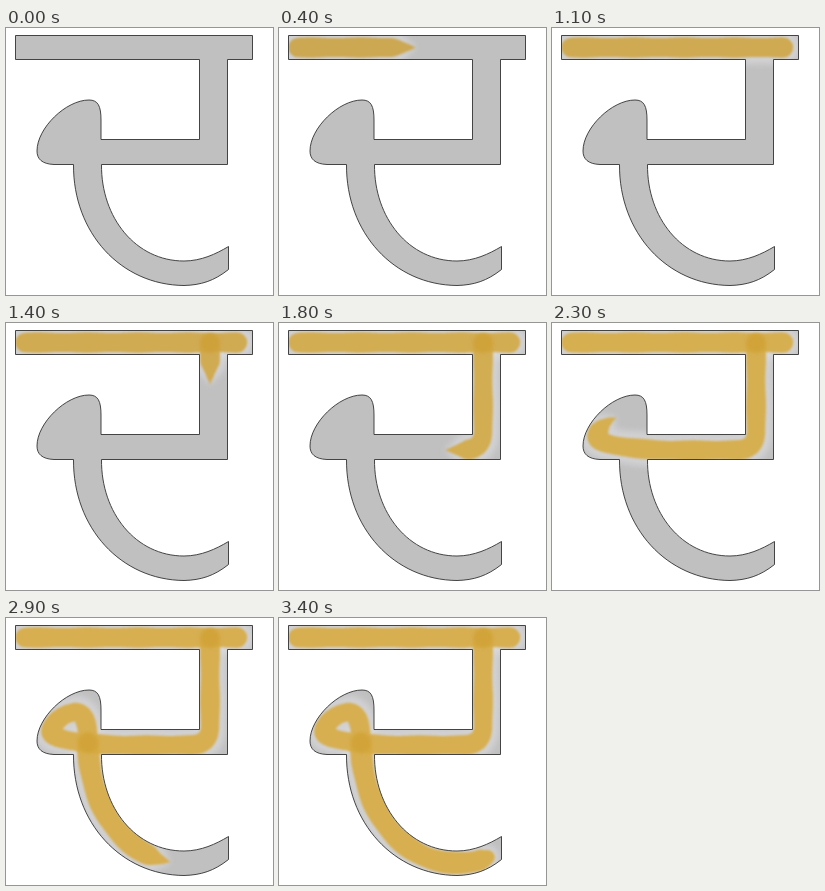
An HTML page with a canvas that plays this animation: 267x267 px, repeating every 3500 ms.

```html
<!DOCTYPE html>
<html lang="en">
<head>
<meta charset="utf-8">
<title>Letter stroke order</title>
<style>
  html, body { margin: 0; width: 100%; height: 100%; overflow: hidden; background: #fff; }
  canvas { display: block; }
</style>
</head>
<body>
<canvas width="267" height="267"></canvas>
<script>
const ctx = document.querySelector('canvas').getContext('2d');
const LOOP = 3500, STEP = 100, TAPER = 24;

const letter = new Path2D(`M9.5 7.5H246.5V31.5H221.5V136.5H95.5
  C95 190 130 233 178 233C195 233 210 226 222.5 218.5V241.5
  C208 253 195 257 178 257.5C115 257 67 205 67.5 136.5H48
  C36 136 31 131 31 123C31 100 60 72 83 72C92 72 95 78 95 92
  V111.5H193.5V31.5H9.5Z`);

// keys: [time in ms, distance the brush tip has travelled]
const strokes = [
  { d: 'M19 19.5H231', r: 9.8,
    keys: [[0, 0], [600, 177], [700, 200], [900, 240]] },
  { d: `M204 20V108Q204 126 186 127C150 127 100 129 66 123
        Q44 119 45 113C47 103 60 94 70 94C80 95 82 110 82 125`, r: 9.6,
    keys: [[1240, 0], [1400, 42], [1800, 138], [2300, 291], [2500, 354]] },
  { d: 'M82 125C82 190 122 245 178 245Q197 245 209 239', r: 10.8,
    keys: [[2400, 0], [2600, 66], [3100, 218]] }
];

for (const s of strokes) {
  const path = document.createElementNS('http://www.w3.org/2000/svg', 'path');
  path.setAttribute('d', s.d);
  s.points = [];
  for (let i = 0; i <= path.getTotalLength(); i++) s.points.push(path.getPointAtLength(i));
}

function valueAt(keys, t) {
  if (t <= keys[0][0]) return keys[0][1];
  for (let i = 1; i < keys.length; i++) {
    const [t0, v0] = keys[i - 1], [t1, v1] = keys[i];
    if (t <= t1) return v0 + (v1 - v0) * (t - t0) / (t1 - t0);
  }
  return keys[keys.length - 1][1];
}

// A brush mark that narrows towards its moving tip
function brushShape(s, tip, extra) {
  const shape = new Path2D();
  s.points.forEach((p, i) => {
    if (i >= tip) return;
    const taper = Math.min(1, (tip - i) / TAPER);
    const r = (s.r + extra + 0.4 * Math.sin(i / 8)) * taper;
    shape.moveTo(p.x + r, p.y);
    shape.arc(p.x, p.y, r, 0, 7);
  });
  return shape;
}

function paint(t, extra, color, alpha, blur) {
  ctx.fillStyle = color;
  ctx.globalAlpha = alpha;
  ctx.filter = `blur(${blur}px)`;
  for (const s of strokes) {
    const tip = valueAt(s.keys, t);
    if (tip > 0) ctx.fill(brushShape(s, tip, extra));
  }
  ctx.filter = 'none';
  ctx.globalAlpha = 1;
}

function draw(t) {
  ctx.fillStyle = '#fff';
  ctx.fillRect(0, 0, 267, 267);
  ctx.fillStyle = '#c0c0c1';
  ctx.fill(letter);

  ctx.save();
  ctx.clip(letter);
  paint(t, 7, '#dedee2', 0.6, 3);
  const k = Math.min(1, t / 2400);
  const ink = `rgb(${200 + 15 * k}, ${161 + 10 * k}, ${70 - 4 * k})`;
  paint(t, 0, ink, 0.9, 1.3);
  // Denser paint where two marks cross
  ctx.filter = 'blur(2px)';
  ctx.fillStyle = 'rgba(204, 156, 48, 0.5)';
  for (const [x, y, from] of [[204, 20, 1300], [82, 125, 2500]]) {
    if (t < from) continue;
    ctx.beginPath();
    ctx.arc(x, y, 10, 0, 7);
    ctx.fill();
  }
  ctx.restore();

  ctx.lineWidth = 0.9;
  ctx.strokeStyle = '#333';
  ctx.stroke(letter);
}

function frame() {
  const t = performance.now() % LOOP;
  draw(Math.floor(t / STEP) * STEP);
  requestAnimationFrame(frame);
}
frame();
</script>
</body>
</html>
```
